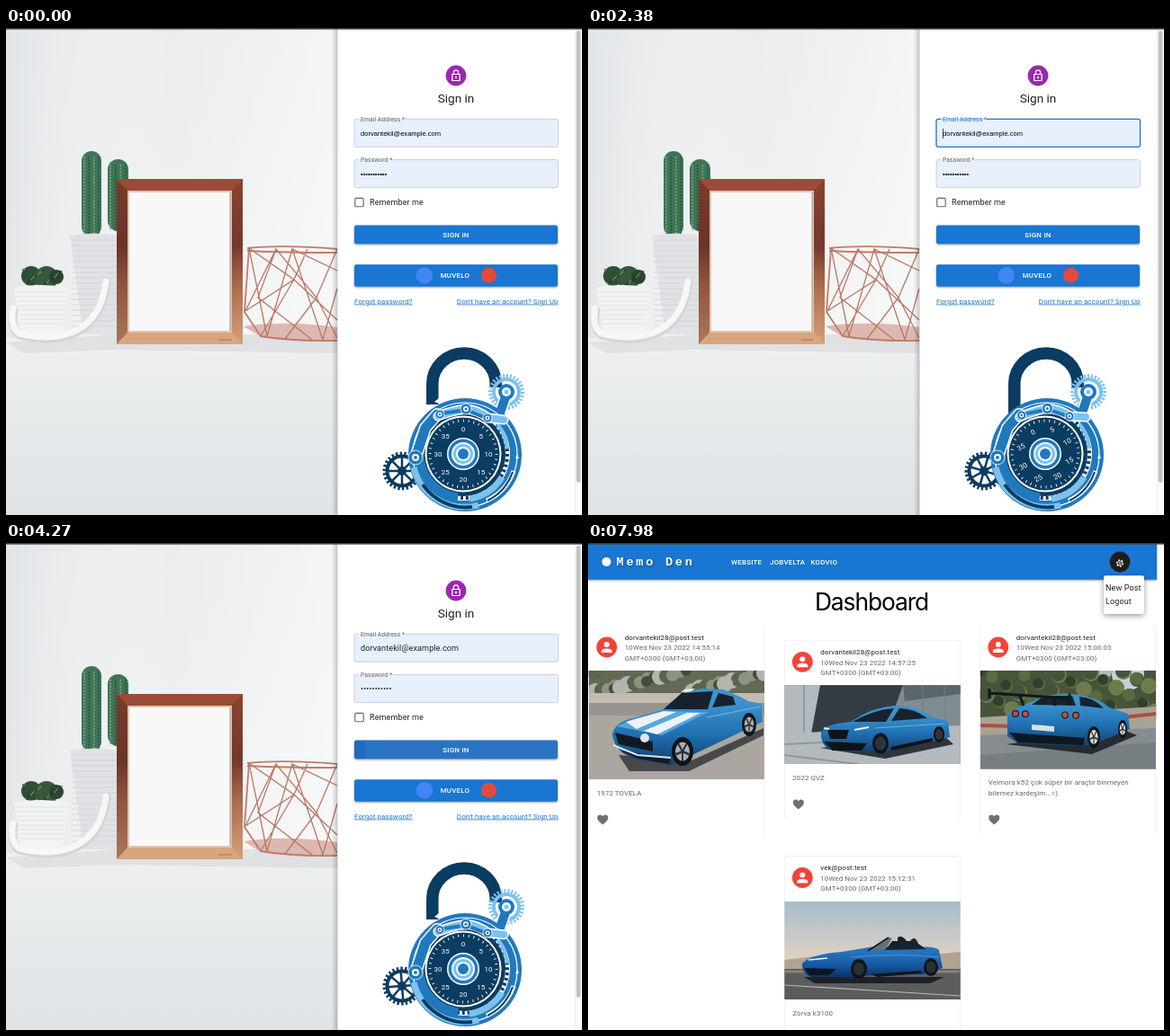
These frames come from a looping animation (640 by 542 pixels, 8 s). An HTML page:

```html
<!DOCTYPE html>
<html lang="en">
<head>
<meta charset="utf-8">
<title>Sign in</title>
<style>
html, body { margin: 0; width: 100%; height: 100%; overflow: hidden; background: #fff; }
svg { display: block; }
body > svg { width: 100vw; height: 100vh; }
text { font-family: Roboto, sans-serif; font-size: 7.94px; letter-spacing: .08px; fill: #666; white-space: pre; }
.arial { font-family: "Liberation Sans", Arial, sans-serif; font-size: 7.55px; letter-spacing: 0; fill: #000; }
.big { font-size: 9.07px; letter-spacing: .085px; fill: #212121; }
.label { font-size: 6.8px; letter-spacing: .06px; }
.caps { font-weight: 500; letter-spacing: .22px; fill: #fff; }
.mid { text-anchor: middle; }
.link { fill: #1976d2; text-decoration: underline; text-decoration-color: #8dbae8; }
.title { font-family: Inter, sans-serif; font-size: 26.4px; letter-spacing: -1.1px; fill: #000; }
.raised { filter: drop-shadow(0 1px 1px #0006); }
.card { filter: drop-shadow(0 .9px .4px #0004); }
.menu { filter: drop-shadow(0 2px 3px #0006); }
</style>
</head>
<body>
<svg viewBox="0 0 640 542" preserveAspectRatio="none">
  <defs>
    <linearGradient id="wall" x2="0" y2="1"><stop stop-color="#e8eaec"/><stop offset=".6" stop-color="#f0f1f2"/><stop offset=".67" stop-color="#eceeef"/><stop offset="1" stop-color="#dfe3e5"/></linearGradient>
    <linearGradient id="glow"><stop stop-color="#dfe2e5" stop-opacity=".7"/><stop offset=".5" stop-color="#fff" stop-opacity=".1"/><stop offset="1" stop-color="#fff" stop-opacity=".5"/></linearGradient>
    <linearGradient id="copper" x2="0" y2="1"><stop stop-color="#8b4331"/><stop offset=".4" stop-color="#73382c"/><stop offset=".65" stop-color="#ad6c4d"/><stop offset="1" stop-color="#d4a07a"/></linearGradient>
    <linearGradient id="edge"><stop stop-color="#000" stop-opacity="0"/><stop offset="1" stop-color="#000" stop-opacity=".22"/></linearGradient>
    <linearGradient id="dusk" x2="0" y2="1"><stop stop-color="#a5bccd"/><stop offset=".62" stop-color="#e3d3c1"/></linearGradient>
    <linearGradient id="paint" x2="0" y2="1"><stop offset=".2" stop-color="#3c92cd"/><stop offset=".6" stop-color="#1f70b2"/><stop offset="1" stop-color="#123f6b"/></linearGradient>
    <linearGradient id="deepPaint" x2="0" y2="1"><stop offset=".2" stop-color="#2672bd"/><stop offset=".6" stop-color="#1558a2"/><stop offset="1" stop-color="#0d2f5c"/></linearGradient>
  </defs>
  <g id="login"></g>
  <g id="dash"></g>
  <g id="status"></g>
  <rect width="640" height="1.6" fill="#3b3b3d"/>
</svg>
<script>
const $ = id => document.getElementById(id);
const NAVY = '#0b3c61', BLUE = '#2179bd', SKY = '#7dc2ec', GLASS = '#17222c';
const USER = 'dorvantekil';

const text = (x, y, s, cls = '', extra = '') => `<text x="${x}" y="${y}" class="${cls}" ${extra}>${s}</text>`;
const box = (x, y, w, h, fill, extra = '') => `<rect x="${x}" y="${y}" width="${w}" height="${h}" fill="${fill}" ${extra}/>`;
const disc = (x, y, r, fill, extra = '') => `<circle cx="${x}" cy="${y}" r="${r}" fill="${fill}" ${extra}/>`;
const ring = (x, y, r, color, w, extra = '') => disc(x, y, r, 'none', `stroke="${color}" stroke-width="${w}" ${extra}`);
const shape = (d, fill, extra = '') => `<path d="${d}" fill="${fill}" ${extra}/>`;
const line = (d, color, w, extra = '') => shape(d, 'none', `stroke="${color}" stroke-width="${w}" ${extra}`);
const crop = (x, y, w, h, body) => `<svg x="${x}" y="${y}" width="${w}" height="${h}" viewBox="${x} ${y} ${w} ${h}">${body}</svg>`;
const teeth = (r, n, color, w) => ring(0, 0, r, color, w, `pathLength="${2 * n}" stroke-dasharray="1 1"`);
const range = n => [...Array(n).keys()];
const spokes = (n, r0, r1, color, w) => range(n).map(i => line(`M0,${r0}V${r1}`, color, w, `transform="rotate(${i * 360 / n})"`)).join('');

// Still life behind the form
function stillLife() {
  const cactus = (x, y, w, h) => box(x, y, w, h, '#3f7556', `rx="${w / 2}"`) +
    range(4).map(i => line(`M${x + 3 + i * (w - 6) / 3},${y + 6}V${y + h}`, i % 2 ? '#23523b' : '#7fa58a', 1.5, 'stroke-dasharray="2 1.5"')).join('');
  const wires = 'M270,245L290,343L318,246L352,347L368,290M270,245L320,280L283,343M266,315L300,246L345,300L310,346M300,246L280,300L340,347M318,246L368,270M345,300L368,246M345,300L368,345M320,280L368,325M335,246L320,280L266,315';
  return crop(0, 0, 369, 542,
    box(0, 0, 369, 542, 'url(#wall)') + box(0, 0, 369, 345, 'url(#glow)') +
    shape('M0,350L120,341H368V362L120,358L20,362Z', '#dfe1e3') +
    cactus(84, 137, 22, 95) + cactus(113, 146, 23, 80) +
    shape('M71,231Q98,226 127,231V341H86Z', '#e0e2e5') +
    range(17).map(i => line(`M73,${236 + i * 6}H126`, '#cfd2d6', .8)).join('') +
    shape('M264,332Q310,325 368,333V349Q300,349 282,343Z', '#dcb9b0') +
    line('M268,245Q310,241 368,246M268,248Q310,250 368,250M270,245L265,316L283,343Q320,349 368,348', '#bd7d68', 1.8) +
    line(wires, '#b97865', 1.3) +
    disc(28, 276, 11, '#304d35') + disc(45, 278, 13, '#38583b') + disc(56, 277, 8, '#2a452f') +
    range(28).map(i => disc(19 + i * 13 % 44, 269 + i * 7 % 17, .9, i % 2 ? '#7c9872' : '#182e20')).join('') +
    shape('M9,289Q38,283 69,289L63,343Q38,350 17,341Z', '#f2f3f4') +
    range(8).map(i => line(`M${11 + i * .7},${294 + i * 5}H${68 - i * .6}`, '#dcdee1', .8)).join('') +
    line('M9,314Q4,335 15,342Q60,353 88,333Q108,317 112,283', '#d2d5d9', 9, 'stroke-linecap="round"') +
    line('M8,312Q4,333 15,340Q60,351 87,331Q107,315 111,282', '#f7f7f8', 7, 'stroke-linecap="round"') +
    box(123, 168, 140, 184, 'url(#copper)') +
    shape('M123,168L136,182V338L123,352Z', '#5a2c20', 'opacity=".35"') +
    shape('M123,168H263L250,182H136Z', '#b75a40', 'opacity=".4"') +
    shape('M123,352L136,338H250L263,352Z', '#d9a57e') +
    box(135, 181, 116, 158, '#e4c3ab') + box(137, 183, 112, 154, '#f8f8f8') +
    line('M249,183V337', '#999', 1) + line('M236,347H251', '#8b6348', .7));
}

function padlock() {
  const numbers = range(8).map(i => {
    const a = i * Math.PI / 4;
    return text(28 * Math.sin(a), 2.8 - 28 * Math.cos(a), i * 5, 'mid', 'style="fill:#fff"');
  }).join('');
  const pivot = (x, y, r) => disc(x, y, r, BLUE, 'stroke="#fff" stroke-width=".8"') + disc(x, y, r * .5, '#fff') + disc(x, y, r * .25, BLUE);
  return `<path id="shackle" fill="none" stroke="${NAVY}" stroke-width="13.5"/>` +
    shape('M481,406V412L476,416L481,418V421H487V406Z', '#fff', 'id="notch"') +
    `<g id="gearL">${teeth(19.5, 26, NAVY, 4)}${ring(0, 0, 16.5, NAVY, 4)}${spokes(8, 4, 16, NAVY, 2.5)}${disc(0, 0, 5, NAVY)}</g>` +
    `<g id="gearR">${teeth(18, 28, SKY, 4)}${ring(0, 0, 14, SKY, 4)}</g>` +
    line('M557,405L549,428', '#fff', 13, 'stroke-linecap="round"') + line('M557,405L549,428', BLUE, 10, 'stroke-linecap="round"') +
    disc(556, 405, 9, BLUE) + disc(556, 405, 5, '#fff') + disc(556, 405, 2.5, SKY) +
    disc(510, 475, 63, BLUE) + ring(510, 475, 58, '#fff', 1.2) +
    line('M453,489A58,58 0 0 0 525,531', SKY, 7) + line('M463,508A58,58 0 0 0 518,533', NAVY, 4) +
    line('M534,526A56,56 0 0 0 564,493', '#fff', 5) + line('M535,526A56,56 0 0 0 563,494', NAVY, 2) +
    `<g id="cog">${disc(0, 0, 52, '#fff')}${disc(0, 0, 47, NAVY)}${teeth(49, 52, NAVY, 4)}</g>` +
    line('M461,463A49,49 0 0 0 502,522', BLUE, 9) + line('M515,524A50,50 0 0 0 551,500', SKY, 7) +
    line('M546,441A50,50 0 0 1 557,468', SKY, 4) +
    line('M479,430L466,445L455,478', '#fff', 14, 'stroke-linejoin="round" stroke-linecap="round"') +
    line('M479,430L466,445L455,478', BLUE, 11, 'stroke-linejoin="round" stroke-linecap="round"') + pivot(455, 478, 8) +
    `<g id="lever">${line('M480,432Q495,426 511,424Q524,425 536,434L553,436', '#fff', 11, 'stroke-linecap="round"')}
    ${line('M480,432Q495,426 511,424Q524,425 536,434L553,436', SKY, 8, 'stroke-linecap="round"')}
    ${line('M484,429L511,425L533,434', BLUE, 4)}${pivot(482, 430, 5)}${pivot(511, 424, 6)}${pivot(535, 434, 5)}</g>` +
    disc(508, 474, 42.5, '#fff') + disc(508, 474, 40.5, NAVY) +
    `<g id="dial">${ring(0, 0, 37, '#fff', 3, 'pathLength="160" stroke-dasharray=".6 3.4"')}${numbers}</g>` +
    disc(508, 474, 18, '#fff') + disc(508, 474, 16.5, BLUE) + disc(508, 474, 13, '#fff') +
    disc(508, 474, 11, SKY) + disc(508, 474, 8, '#fff') + disc(508, 474, 6, BLUE) +
    shape('M568,474l2,5h-4z', '#fff');
}

const field = (name, y, label, width) =>
  box(387, y, 226.5, 31, '#e8f0fe', `rx="2.3" stroke="#bcc0c6" stroke-width=".7" id="${name}Box"`) +
  box(392, y - 1, width, 1.2, '#fff') + box(392, y + .2, width, 1, '#e8f0fe') +
  text(394, y + 2.2, label, 'label', `id="${name}Label"`);

const thumb = h => box(632, 0, 8, 542, '#fafafa') + line('M632.3,0V542', '#e6e6e6', .6) + box(633.7, 3, 4.8, h, '#c1c1c1', 'rx="2.4"');

$('login').innerHTML = stillLife() +
  box(362, 0, 7, 542, 'url(#edge)') + box(368.5, 0, 272, 542, '#fff') +
  disc(500, 53, 11.4, '#9c27b0') + line('M495.8,51.5H504.2V58.5H495.8ZM497.4,51.5V49.4a2.6,2.6 0 0 1 5.2,0V51.5', '#fff', 1.2) + disc(500, 55, 1.2, '#fff') +
  text(500, 83, 'Sign in', 'mid', 'style="font-size:13.6px;letter-spacing:0;fill:#212121"') +
  field('mail', 101.3, 'Email Address *', 51) + field('pass', 146.6, 'Password *', 38) +
  text(394, 120.2, USER + '@example.com', '', 'id="mail"') + text(394, 165, '•'.repeat(11), '', 'id="pass"') +
  box(394, 112, .7, 11, '#000', 'id="caret"') +
  box(387.8, 189.4, 9.4, 9.4, 'none', 'rx="1" stroke="#666" stroke-width="1.15"') + text(404, 197.3, 'Remember me', 'big') +
  box(387, 219.5, 226, 20.8, '#1976d2', 'rx="2.3" class="raised" id="button"') +
  crop(387, 219.5, 226, 20.8, disc(590, 230, 0, '#fff', 'opacity=".06" id="ripple"')) +
  text(500, 232.8, 'SIGN IN', 'caps mid') +
  box(387, 263.3, 226, 24.4, '#1976d2', 'rx="2.3" class="raised"') +
  disc(465, 275.3, 9.3, '#4285f4') + disc(536.5, 275.3, 8.5, '#e34a3b') + text(499, 278.1, 'MUVELO', 'caps mid') +
  text(387, 306.5, 'Forgot password?', 'link') +
  text(613.5, 306.5, "Don't have an account? Sign Up", 'link', 'text-anchor="end"') +
  padlock() + thumb(503);

const wheel = (x, y, rx, ry, rim = '#a9b0b5') =>
  `<g transform="translate(${x} ${y}) scale(${rx / 10} ${ry / 10})">${disc(0, 0, 10, '#101418')}${disc(0, 0, 6.6, rim)}${spokes(5, 0, 6.5, '#2a3036', 1.6)}</g>`;
const foliage = (x, y, n, depth, colors) =>
  range(n).map(i => disc(x + i * 29 % 196, y + i * 17 % depth, 6 + i % 4, colors[i % colors.length])).join('');

const photos = [
  () => box(1, 142, 195, 121, '#aba69f') + box(1, 142, 195, 30, '#626a55') +
    foliage(1, 142, 40, 24, ['#434d38', '#8d9384', '#5a654a', '#b3b5ac']) +
    box(1, 167, 195, 11, '#c3bbb0') + shape('M1,178H196V192H1Z', '#989490') +
    shape('M34,236L115,242L195,206V214L112,254H46Z', '#48474a') +
    shape('M27,213Q29,201 46,196L82,186Q103,165 127,162L150,163Q168,170 178,176L193,179L194,199L124,232L92,247L56,241Q30,235 27,213Z', 'url(#paint)') +
    shape('M32,204L50,196L84,187L134,188L82,214Z', '#58a6dc') +
    shape('M84,185L104,167L139,165L133,185Z', GLASS) + shape('M138,183L145,167L161,171L164,180Z', GLASS) +
    shape('M42,199L84,187L98,188L54,207ZM62,209L110,189L125,189L77,213ZM107,163L119,162L115,165L103,166Z', '#eef2f4') +
    shape('M30,211L72,221V232L34,224Z', '#111a23') + shape('M36,231L92,240L90,246L56,240Z', '#0d1c2a') +
    line('M28,225L55,236L92,239', '#dce1e5', 2.2) + line('M132,194L192,182', '#7cbbe5', 1) +
    disc(63, 217, 5, '#dfe4e7') + wheel(105, 232, 12, 16) + wheel(179, 202, 8, 13),
  () => box(218, 158, 196, 88, '#818c92') + shape('M218,158H262L250,214H218Z', '#b3babd') + shape('M258,158H350L338,192L262,212H248Z', '#333c42') +
    shape('M350,158H414V168L352,176Z', '#5b666c') + line('M240,158V212M372,158V194M396,158V198', '#727d83', 1) +
    shape('M218,212L414,203V246H218Z', '#b3babd') + line('M218,236L300,246M218,224L262,222', '#8e979b', 2) + shape('M258,228L330,240L406,224L395,214Z', '#2d353a') +
    shape('M259,211Q263,201 292,199Q315,183 340,181Q366,181 383,194L400,198L402,216L380,222L325,233L272,231Q258,226 259,211Z', 'url(#paint)') +
    shape('M294,199Q318,185 340,184L331,199ZM337,198L346,184Q362,184 377,195Z', GLASS) +
    shape('M266,208H290L287,218H269ZM262,221L310,223L304,231H272ZM337,227L383,217V221L337,231Z', '#0d141a') +
    line('M262,206L268,207M296,208L312,205', '#e5f3fa', 2) + line('M318,206L396,201', '#63b5e6', 1) +
    wheel(325, 223, 9, 11.5, '#30383e') + wheel(390, 213, 6, 9, '#30383e'),
  () => box(436, 142, 195, 110, '#858d90') + box(436, 142, 195, 60, '#46543a') +
    disc(600, 146, 18, '#c3cfd3') + disc(572, 143, 10, '#aebbbb') +
    foliage(436, 142, 54, 46, ['#31402b', '#5a6a42', '#43523a', '#6f7b4e']) +
    shape('M436,194L631,182V206L436,214Z', '#a8a294') + line('M436,203L475,204M595,194L631,190', '#a8503f', 4) +
    shape('M436,236L631,222V252H436Z', '#767e82') + shape('M465,224L560,235L610,214L590,206Z', '#252c31') +
    shape('M466,191Q480,180 492,177Q510,167 538,168Q566,171 579,183L600,190L602,207L558,226L478,223L466,215Z', 'url(#paint)') +
    shape('M493,180L507,170L538,170L542,181ZM547,181L546,171Q562,172 573,184Z', GLASS) +
    line('M446,167L535,173M446,162V173M535,168V180M480,170L484,181M517,172L519,181', '#10181e', 3) +
    [475, 486, 530, 542].map(x => disc(x, 190 + (x - 475) / 40, 4, '#12222f') + disc(x, 190 + (x - 475) / 40, 2.8, '#cf4a40')).join('') +
    shape('M493,202L518,204V210L493,208Z', '#dbdfe0') + shape('M468,211L552,217L550,225L478,222Z', '#0d1822') +
    wheel(562, 216, 7, 12, '#dadddd') + wheel(594, 207, 5, 10, '#dadddd'),
  () => box(218, 399, 196, 110, 'url(#dusk)') + shape('M218,464L270,458L330,463L414,455V480H218Z', '#b0a392') +
    box(218, 474, 196, 35, '#5a5c5e') + line('M218,477H414', '#8a8278', 3) + line('M218,492L414,504', '#b5b5b1', 1.2) +
    shape('M240,483H396L380,490H252Z', '#1d2125') +
    shape('M238,468Q246,458 282,455L318,449L360,451Q384,447 390,453L394,473L372,480H322L290,484L248,483Q237,479 238,468Z', 'url(#deepPaint)') +
    shape('M311,454L334,439L338,440L330,453Z', '#60717e') + shape('M330,453L338,443H344V439Q349,436 354,443H358Q363,436 367,446L376,452Z', GLASS) +
    line('M311,454L334,439', '#151b21', 1.5) + line('M245,464L266,462', '#e2edf5', 1.6) +
    shape('M240,473L276,474L268,481H246ZM314,480L370,476V479L322,483Z', '#0a1626') + line('M292,461Q345,456 390,461', '#4b93d6', 1) +
    wheel(301, 474, 9, 11, '#282e34') + wheel(381, 472, 8, 10, '#282e34')
];

function card(x, top, photoH, bottom, email, time, caption, i) {
  const imageTop = top + 50, captionY = imageTop + photoH + 17.8;
  return box(x, top, 195, bottom - top, '#fff', 'rx="2.3" class="card"') +
    disc(x + 20, top + 24, 11.4, '#f44336') + disc(x + 20, top + 21, 3, '#fff') + shape(`M${x + 14},${top + 30}v-1.5q0,-3 6,-3t6,3v1.5z`, '#fff') +
    text(x + 40, top + 15.9, email, '', 'style="fill:#212121"') +
    text(x + 40, top + 27.4, '10Wed Nov 23 2022 ' + time) + text(x + 40, top + 38.7, 'GMT+0300 (GMT+03:00)') +
    crop(x, imageTop, 195.5, photoH, photos[i]()) +
    caption.map((s, k) => text(x + 9, captionY + k * 11.3, s)).join('') +
    shape(`M${x + 15.5},${bottom - 10.5}c-4,-3.6 -6,-5 -6,-7.8c0,-3.6 4.2,-4.4 6,-1.4c1.8,-3 6,-2.2 6,1.4c0,2.8 -2,4.2 -6,7.8z`, '#707070');
}

$('dash').innerHTML = box(0, 0, 640, 542, '#fff') +
  `<g id="posts">${card(.8, 92, 121, 324, USER + '28@post.test', '14:55:14', ['1972 TOVELA'], 0)}
  ${card(218.3, 108.3, 87.7, 307, USER + '28@post.test', '14:57:25', ['2022 QVZ'], 1)}
  ${card(435.8, 92, 109.5, 324, USER + '28@post.test', '15:06:03', ['Velmora k52 çok süper bir araçtır binmeyen', 'bilemez kardeşim...=)'], 2)}
  ${card(218.3, 348.5, 109.5, 570, 'vek@post.test', '15:12:31', ['Zorva k3100'], 3)}</g>` +
  box(0, 0, 640, 40.7, '#1976d2', 'id="bar" style="filter:drop-shadow(0 1px 1.2px #0006)"') +
  disc(20.5, 21, 5, '#fff') +
  text(31.5, 25.2, 'Memo Den', '', 'style="font:700 13.6px \'Liberation Mono\',monospace;letter-spacing:2.72px;fill:#fff;filter:drop-shadow(1px 1px 1px #0005)"') +
  `<g id="nav">${text(159, 23.8, 'WEBSITE', 'caps')}${text(202, 23.8, 'JOBVELTA', 'caps')}${text(247.5, 23.8, 'KODVIO', 'caps')}</g>` +
  text(0, 75.3, 'Dashboard', 'title mid', 'id="title"') +
  `<g id="avatar">${disc(0, 0, 11.4, '#1d1d1f', 'stroke="#444b52" stroke-width=".6"')}<g transform="translate(0 1.5)">${teeth(3.5, 6, '#eee', 1.4)}${ring(0, 0, 2.6, '#eee', 1)}${disc(0, 0, .9, '#eee')}</g></g>` +
  `<g id="scroll">${thumb(516)}</g>` +
  `<g id="menu" class="menu">${box(573, 36.3, 45, 42.7, '#fff', 'rx="2.3"')}${text(575, 52.5, 'New Post', 'big')}${text(575, 68.3, 'Logout', 'big')}</g>`;

$('status').innerHTML = '<path id="statusBox" fill="#2c2c2e"/>' + text(2.5, 540.2, '', 'arial', 'id="statusText" style="font-size:7.05px;fill:#fff"');

const clamp = v => Math.min(1, Math.max(0, v));
const ease = (t, from, to) => { const v = clamp((t - from) / (to - from)); return v * v * (3 - 2 * v); };
const show = (id, on) => $(id).setAttribute('display', on ? 'inline' : 'none');
const set = (id, attrs) => { for (const k in attrs) $(id).setAttribute(k, attrs[k]); };

function drawLogin(t) {
  const focus = t >= 1300 && t < 3850, filled = t >= 3850;
  set('mailBox', { stroke: focus ? '#1976d2' : '#bcc0c6', 'stroke-width': focus ? 1.3 : .7 });
  $('mailLabel').style.fill = focus ? '#1976d2' : '#666';
  for (const id of ['mail', 'pass']) set(id, { class: filled ? 'big' : 'arial' });
  show('caret', focus && (t - 1300) % 1000 < 500);
  set('button', { fill: filled ? '#1c6bbf' : '#1976d2' });
  set('ripple', { r: Math.max(0, .56 * (t - 3930)) });

  const closed = ease(t, 1900, 2700) - ease(t, 3430, 4000);
  const sway = Math.sin(t / 420);
  set('dial', { transform: `translate(508 474) rotate(${-45 * closed})` });
  set('cog', { transform: `translate(508 474) rotate(${60 * closed + 3 * sway})` });
  set('gearL', { transform: `translate(440 493) rotate(${90 * closed + t * .02})` });
  set('gearR', { transform: `translate(556 405) rotate(${-90 * closed - t * .02})` });
  set('lever', { transform: `rotate(${-4 * closed + sway} 535 434) translate(0 ${-3 * closed})` });
  set('shackle', { d: `M473.8,${419 + 22 * closed}V396A35.2,34 0 0 1 544.2,396V400` });
  show('notch', closed < .3);
}

function drawDash(t) {
  const posts = t >= 5110, open = t >= 7280, grow = ease(t, 7280, 7560);
  for (const id of ['posts', 'nav']) show(id, posts);
  show('scroll', posts && !open);
  show('menu', open);
  set('bar', { width: posts ? 632 : 640 });
  set('title', { x: posts ? 315 : 319.5 });
  set('avatar', { transform: `translate(${posts ? 591 : 599.5} 21)` });
  const s = .75 + .25 * grow;
  set('menu', { opacity: grow, transform: `translate(595 36) scale(${s} ${s * s}) translate(-595 -36)` });
}

function draw(now) {
  const t = now % 8000, signedIn = t >= 4480;
  show('login', !signedIn);
  show('dash', signedIn);
  signedIn ? drawDash(t) : drawLogin(t);
  const hover = t >= 2800 && t < 3360, waiting = signedIn && t < 5110;
  show('status', hover || waiting);
  set('statusBox', { d: `M0,532H${waiting ? 210 : 74}q2.5,0 2.5,2.5V542H0Z` });
  $('statusText').textContent = waiting ? 'identitytoolkit.googleapis.com bekleniyor...' : 'localhost:3000/login#';
  requestAnimationFrame(() => draw(performance.now() - start));
}
const start = performance.now();
draw(0);
</script>
</body>
</html>
```
